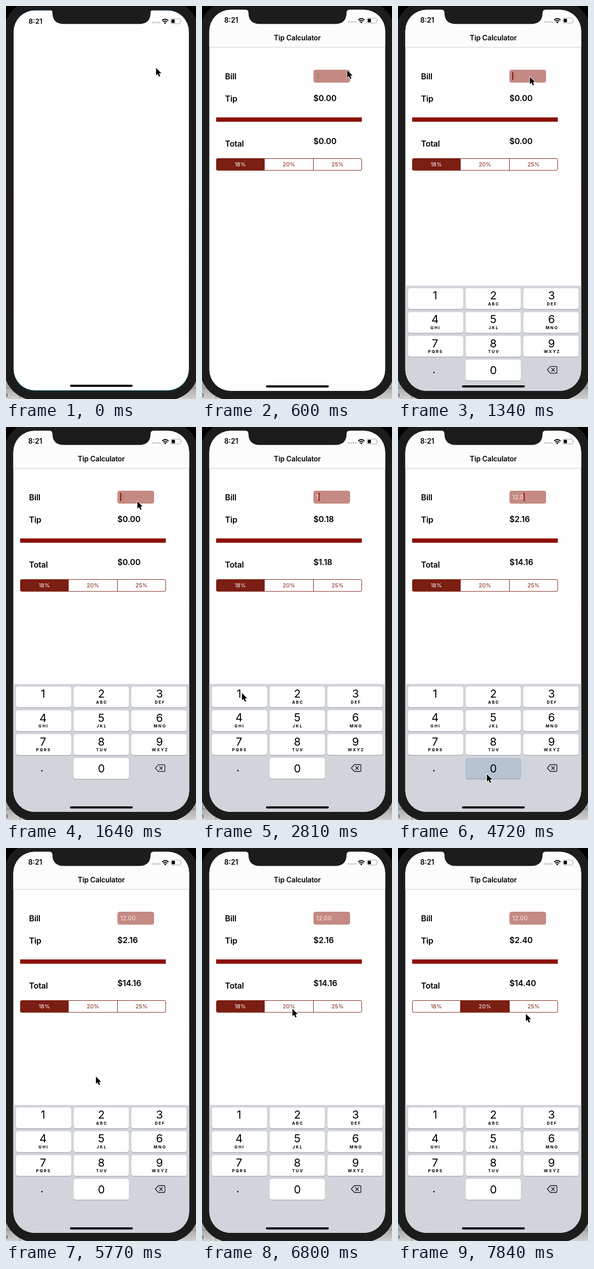
Write an HTML page that moves like this. It is 376 px wide and 777 px high and loops after 7.99 s.

```html
<!DOCTYPE html>
<html lang="en">
<head>
<meta charset="utf-8">
<title>Tip Calculator</title>
<style>
  html, body { margin: 0; width: 100%; height: 100%; overflow: hidden; background: #000; }
  svg { display: block; width: 376px; height: 777px; font-family: Inter, "Open Sans", sans-serif; }
  .label { font-size: 16px; font-weight: 600; letter-spacing: -.15px; }
  .mid { text-anchor: middle; }
  .digit { font-size: 22px; }
  .letters { font-size: 8px; font-weight: 700; letter-spacing: 1.9px; }
  .segment { font-size: 11px; }
  .field { font-size: 12px; }
</style>
</head>
<body>
<svg viewBox="0 0 376 777">
  <defs>
    <clipPath id="screenShape"><rect x="14.5" y="7.5" width="348" height="753.5" rx="42"/></clipPath>
    <linearGradient id="edge" x2="0" y2="1">
      <stop offset="0" stop-color="#16324a"/><stop offset=".4" stop-color="#26343f"/>
      <stop offset=".5" stop-color="#6a1820"/><stop offset=".8" stop-color="#5a1a22"/>
      <stop offset=".9" stop-color="#1b3a44"/><stop offset="1" stop-color="#0b5a5a"/>
    </linearGradient>
    <linearGradient id="desk" x2="0" y2="1">
      <stop offset="0" stop-color="#8c8c8c"/><stop offset="1" stop-color="#cfcfcf"/>
    </linearGradient>
  </defs>

  <rect y="735" width="376" height="42" fill="url(#desk)"/>
  <path d="M0 755.5H376M27.5 768V777" stroke="#777"/>
  <text x="-3" y="773" font-size="11" fill="#333">o</text>
  <rect x="-4" y="-11" width="385" height="790.5" rx="62" fill="#1c1c1c"/>
  <rect x="14.5" y="7.5" width="348" height="753.5" rx="42" fill="url(#edge)"/>

  <g id="screen" clip-path="url(#screenShape)">
    <rect x="14" y="7" width="349" height="755" fill="#fefefe"/>
    <g id="app">
      <rect x="14" y="7" width="349" height="74" fill="#fcfcfc"/>
      <path d="M14 81.5H363" stroke="#cfcfcf"/>
      <text class="mid" x="188.5" y="68" font-size="14" font-weight="600" letter-spacing="-.12">Tip Calculator</text>
      <g class="label">
        <text x="45.5" y="144.7">Bill</text>
        <text x="45.5" y="188.7">Tip</text>
        <text x="45.5" y="277.5">Total</text>
        <text id="tip" x="220.5" y="188"></text>
        <text id="total" x="220.5" y="273"></text>
      </g>
      <rect x="220.5" y="126" width="72.5" height="25.5" rx="4.5" fill="#c48a83"/>
      <text id="bill" class="field" x="226" y="143"></text>
      <rect id="caret" y="130" width="2" height="16.5" fill="#8c1509"/>
      <rect x="28" y="220.3" width="288.3" height="8.5" fill="#8a1003"/>
      <g id="segments"></g>
      <rect x="28.5" y="301.5" width="287.5" height="23.5" rx="3" fill="none" stroke="#7b1e13"/>
      <path d="M123.5 301.5V325M220.5 301.5V325" stroke="#7b1e13"/>
    </g>
    <g id="keyboard">
      <rect x="14" y="508" width="349" height="300" fill="#d1d4da"/>
      <g id="keys"></g>
      <circle cx="71" cy="679.5" r="1.4"/>
      <g fill="none" stroke="#111" stroke-width="1.3" stroke-linejoin="round" stroke-linecap="round">
        <path d="M301.5 667.5H312.5Q314.5 667.5 314.5 669.5V679Q314.5 681 312.5 681H301.5L295.5 674.2Z"/>
        <path d="M303.8 671.2L309.8 677.2M309.8 671.2L303.8 677.2"/>
      </g>
    </g>
    <text x="44" y="33.3" font-size="13.8" font-weight="600">8:21</text>
    <path d="M289 31.6h17" stroke="#c3c3c5" stroke-width="3" stroke-dasharray="3 1.5"/>
    <g fill="none" stroke="#000" stroke-width="2">
      <path d="M309 27.8Q315.3 21.7 321.6 27.8M311.4 30.3Q315.3 26.7 319.2 30.3"/>
    </g>
    <path d="M313 32Q315.3 30 317.6 32L315.3 34.4Z"/>
    <rect x="326.5" y="23.8" width="19.5" height="10" rx="2.6" fill="none" stroke="#a5a5a5"/>
    <rect x="328" y="25.3" width="6.3" height="7" rx="1.2"/>
    <path d="M347 27Q348.8 28.8 347 30.6Z" fill="#a5a5a5"/>
    <rect x="126.5" y="750" width="124.5" height="4.2" rx="2.1"/>
  </g>
  <path d="M85 7q7 0 7 7c0 14 8 21.5 22 21.5H264c14 0 22-7.5 22-21.5q0-7 7-7z" fill="#1c1c1c"/>
  <path id="cursor" d="M0 0V14.5L3.3 11.5L5.7 17L8.2 16L5.9 10.6H10.4Z" stroke="#fff" stroke-width="1.8" paint-order="stroke" stroke-linejoin="round"/>
</svg>
<script>
const $ = id => document.getElementById(id);
const LOOP = 7990, TICKS = 54, TICK = LOOP / TICKS;
const RED = '#7b1e13';

const rates = [18, 20, 25];
$('segments').innerHTML = rates.map((rate, i) =>
  `<rect x="${28 + 96 * i}" y="301.5" width="96" height="23.5" rx="${i ? 0 : 3}"/>
   <text class="segment mid" x="${75.7 + 96.3 * i}" y="317.3">${rate}%</text>`).join('');

const letters = ['', 'ABC', 'DEF', 'GHI', 'JKL', 'MNO', 'PQRS', 'TUV', 'WXYZ'];
const makeKey = (digit, col, row, sub) => {
  const x = 19.5 + 114.3 * col, y = 513 + 47.1 * row, cx = 73.3 + 115.3 * col;
  return `<rect x="${x}" y="${y + 1}" width="109.5" height="41.3" rx="4.5" fill="#909399"/>
    <rect id="key${digit}" x="${x}" y="${y}" width="109.5" height="41.3" rx="4.5"/>
    <text class="digit mid" x="${cx}" y="${y + (digit ? 22.3 : 28.5)}">${digit}</text>
    <text class="letters mid" x="${cx + 1}" y="${y + 34}">${sub}</text>`;
};
$('keys').innerHTML = letters.map((sub, i) => makeKey(i + 1, i % 3, i / 3 | 0, sub)).join('') + makeKey(0, 1, 3, '');

// [time, x, y] of the pointer tip
const path = [
  [0, 297, 122.5], [440, 297, 122.5], [890, 261, 140], [1340, 261, 140], [1600, 261, 144.5],
  [2230, 79, 526], [2810, 79, 526], [3400, 168, 544], [3560, 168, 544], [4130, 95, 683],
  [4580, 176, 686.5], [5350, 176, 686.5], [6060, 179, 318], [7400, 179, 318], [7690, 253, 328], [LOOP, 253, 328]
];
const typed = [[1190, ''], [2650, '1'], [3540, '12'], [4130, '12.'], [4720, '12.0'], [5020, '12.00']];
const presses = [[1, 2500, 2750], [2, 3400, 3640], [0, 4720, 5020]];

const clamp = v => Math.max(0, Math.min(1, v));
const smooth = v => v * v * (3 - 2 * v);
const money = v => '$' + v.toFixed(2);

function pointer(t) {
  const i = Math.max(1, path.findIndex(p => p[0] >= t));
  const [t0, x0, y0] = path[i - 1], [t1, x1, y1] = path[i];
  const k = smooth(clamp((t - t0) / (t1 - t0)));
  return [x0 + (x1 - x0) * k, y0 + (y1 - y0) * k];
}

function draw(t) {
  const scale = 1 - .0035 * (1 - clamp(t / 290));
  $('screen').setAttribute('transform', `translate(188.5 384) scale(${scale}) translate(-188.5 -384)`);
  $('app').setAttribute('opacity', clamp((t - 250) / 300));
  $('keyboard').setAttribute('transform', `translate(0 ${256 * (1 - clamp((t - 1100) / 600)) ** 3.56})`);
  $('cursor').setAttribute('transform', `translate(${pointer(t)})`);

  const [since, text] = typed.filter(e => e[0] <= t + 20).pop() || [Infinity, ''];
  const bill = $('bill');
  bill.textContent = text || '$';
  bill.setAttribute('fill', text ? '#f7eae8' : '#ab756e');
  $('caret').setAttribute('x', text ? 226 + bill.getComputedTextLength() - .3 : 226);
  $('caret').setAttribute('opacity', t + 20 >= since && Math.max(0, t - since) % 1000 <= 451 ? 1 : 0);

  const chosen = t < 6900 ? 0 : 1;
  const amount = Number(text), tip = amount * rates[chosen] / 100;
  $('tip').textContent = money(tip);
  $('total').textContent = money(amount + tip);
  rates.forEach((_, i) => {
    const [box, label] = [...$('segments').children].slice(2 * i, 2 * i + 2);
    box.setAttribute('fill', i === chosen ? RED : 'none');
    label.setAttribute('fill', i === chosen ? '#fff' : RED);
  });
  for (let d = 0; d < 10; d++) {
    const down = presses.some(([key, from, to]) => key === d && t + 20 >= from && t + 20 < to);
    $('key' + d).setAttribute('fill', down ? '#b5c3d2' : '#fefefe');
  }
}

function frame() {
  const tick = Math.floor(performance.now() % LOOP / TICK + .2) % TICKS;
  draw(tick * TICK);
  requestAnimationFrame(frame);
}
frame();
</script>
</body>
</html>
```
